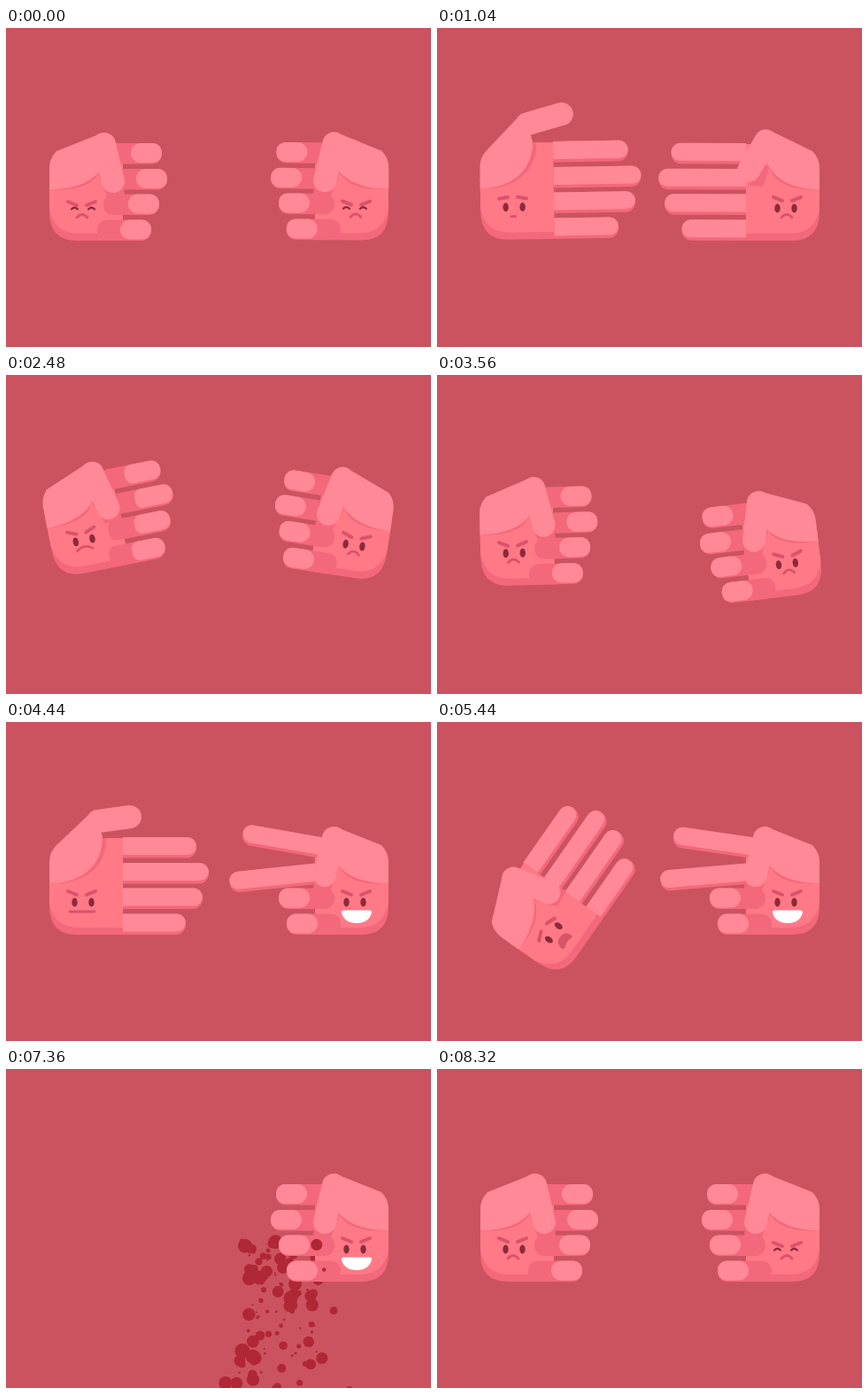
An HTML page that plays this animation: 480x360 px, repeating every 8360 ms.

```html
<!DOCTYPE html>
<html lang="en">
<head>
<meta charset="utf-8">
<title>Rock paper scissors</title>
<style>
html, body { margin: 0; width: 100%; height: 100%; overflow: hidden; background: #cb535f; }
svg { display: block; width: 100vw; height: 100vh; }
</style>
</head>
<body>
<svg id="stage" viewBox="0 0 480 360"></svg>
<script>
const LOOP = 8360, CUT = 5850;
const LIGHT = '#ff8996', MID = '#ff7986', DARK = '#f4687b', LINE = '#d9536a', EYE = '#8c2a3b', BLOOD = '#b02735';
const stage = document.getElementById('stage');

const lerp = (a, b, p) => a + (b - a) * p;
const clamp = v => Math.max(0, Math.min(1, v));
const rnd = n => { const v = Math.sin(n * 127.1 + 11.7) * 43758.5453; return v - Math.floor(v); };
const f = v => +v.toFixed(2);
const pt = p => f(p[0]) + ' ' + f(p[1]);
const mix = (a, b, p) => [lerp(a[0], b[0], p), lerp(a[1], b[1], p)];
const shape = (d, fill) => `<path d="${d}" fill="${fill}"/>`;
const stroke = (d, color, w) => `<path d="${d}" fill="none" stroke="${color}" stroke-width="${w}" stroke-linecap="round" stroke-linejoin="round"/>`;
const dot = (x, y, r) => `<circle cx="${f(x)}" cy="${f(y)}" r="${f(r)}" fill="${BLOOD}"/>`;

// Eased value of a list of [time, value] keys
function track(t, keys) {
  if (t <= keys[0][0]) return keys[0][1];
  for (let i = 1; i < keys.length; i++) {
    const [t0, a] = keys[i - 1], [t1, b] = keys[i];
    if (t < t1) return lerp(a, b, 0.5 - 0.5 * Math.cos(Math.PI * (t - t0) / (t1 - t0)));
  }
  return keys[keys.length - 1][1];
}

// A shake: up and down strokes, a last raise, then rest
function shake(start, strokes, end) {
  const n = strokes * 2 + 1, keys = [[start, 0]];
  for (let i = 1; i <= n; i++) keys.push([start + (end - start) * i / n, i % 2 ? 15.5 : -15.5]);
  return [...keys, [end + 190, 0]];
}
const SHAKES = [...shake(10, 3, 880), ...shake(1300, 4, 2415), ...shake(3130, 3, 4000)];

const FIRST_PAPER = [[920, 0], [1015, 1.04], [1050, 1.04], [1130, 1], [1230, 1], [1340, 0]];
const L_EXT = [...FIRST_PAPER, [2390, 0], [2465, 0.3], [2600, 0], [4030, 0], [4130, 1.04], [4230, 1], [7200, 1], [7201, 0]];
const L_THUMB = [[930, 0], [1030, 1.12], [1130, 1], [1230, 1], [1340, 0], [4040, 0], [4150, 1.12], [4260, 1], [4540, 1], [4680, 0]];
const R_THUMB = [[1010, 0], [1120, 1], [1230, 1], [1340, 0]];
const R_SCISSOR = [[4030, 0], [4140, 1.05], [4230, 1], [6950, 1], [7150, 0]];

const L_TURN = [[4520, 0], [4750, -62], [5150, -62], [5450, -56], [5700, -42], [5870, -42], [6150, -62], [6450, -62], [6900, -80], [7200, -80], [7201, 0]];
const L_X = [[4520, 49], [4750, 126], [5150, 130], [5450, 140], [5700, 205], [5870, 205], [6150, 186], [6450, 186], [7000, 165], [7200, 165], [7201, 49]];
const L_Y = [[4520, 240], [4750, 238], [5150, 238], [5450, 290], [5700, 254], [5870, 258], [6150, 251], [6400, 251], [7000, 640], [7440, 640], [7850, 195], [8100, 240]];

const L_BLINK = [[0, 0], [40, 0], [110, 1], [5800, 1], [CUT, 0], [7200, 0], [7300, 1], [8325, 1], [8358, 0]];
const R_BLINK = [[0, 0], [40, 0], [110, 1], [5850, 1], [5920, 0], [6900, 0], [6980, 1], [8240, 1], [8310, 0]];
const L_BROW = [[940, 1], [1010, -0.4], [1230, -0.4], [1320, 1], [4460, 1], [4560, -1], [5800, -1], [CUT, 1]];
const L_MOUTH_W = [[940, 6], [1010, 2.5], [1230, 2.5], [1320, 6], [2380, 6], [2460, 9], [2960, 9], [3160, 6], [4160, 6], [4260, 14], [4540, 14], [4600, 6]];
const L_MOUTH_C = [[940, 7], [1010, 0], [1230, 0], [1320, 7], [4160, 7], [4260, 0], [4540, 0], [4600, 7]];
const L_WAIL = [[4560, 0], [4660, 0.65], [5780, 0.65], [CUT, 1], [7200, 1], [7201, 0]];
const R_GRIN = [[4170, 0], [4290, 1], [7900, 1], [8050, 0]];
const LAUGH = [[5640, 0], [5760, 8], [5870, 1], [5980, 9], [6080, 3], [6260, 9], [6380, 3], [6500, 10], [6620, 3], [6760, 10], [6900, 2], [7050, 7], [7250, 0]];

const FIST_TIP = [176, 182, 173, 164], OPEN_TIP = [215, 229, 222, 203];
const ROOT = [114, 114, 110, 103], TOP = [130, 159, 187.5, 216.5], STUMP = [159, 176, 167, 170];

function leftPose(t) {
  const a = track(t, SHAKES);
  const fear = t > 4700 && t < 5700 ? Math.sin(t / 18) * 1.5 : 0;
  return { turn: track(t, L_TURN) - a + fear, x: track(t, L_X) - 49 + a * 0.8, y: track(t, L_Y) - 240 - a * 0.9 };
}
function rightPose(t) {
  const a = track(t + 22, SHAKES) + track(t, LAUGH);
  return { turn: -a, x: a * 0.8, y: -a * 0.7 };
}
const place = p => `translate(${f(p.x)} ${f(p.y)}) rotate(${f(p.turn)} 49 240)`;

function toWorld(p, x, y) {
  const r = p.turn * Math.PI / 180, c = Math.cos(r), s = Math.sin(r), dx = x - 49, dy = y - 240;
  return [49 + p.x + dx * c - dy * s, 240 + p.y + dx * s + dy * c];
}

function bar(x0, x1, y, h, rl, rr) {
  return `M${f(x0 + rl)} ${f(y)}H${f(x1 - rr)}a${rr} ${rr} 0 0 1 ${rr} ${rr}v${f(h - 2 * rr)}a${rr} ${rr} 0 0 1 ${-rr} ${rr}` +
    `H${f(x0 + rl)}a${f(rl)} ${f(rl)} 0 0 1 ${f(-rl)} ${f(-rl)}v${f(2 * rl - h)}a${f(rl)} ${f(rl)} 0 0 1 ${f(rl)} ${f(-rl)}z`;
}

function finger(i, ext, spread, cut) {
  const e = clamp(ext), y = TOP[i];
  const tip = cut ? STUMP[i] : lerp(FIST_TIP[i], OPEN_TIP[i], ext);
  const open = 132 - 16 * spread, rl = 11 * (1 - e), rr = cut ? 2 : 10;
  const turn = spread * (i === 0 ? -10 : i === 1 ? 6 : 0);
  let s = shape(bar(lerp(ROOT[i], open, e), tip, y, 23.5, rl, cut ? 2 : 11), DARK) +
    shape(bar(lerp(tip - 35, open, e), tip, y, lerp(22, 20, e), rl, rr), LIGHT);
  if (cut) s += `<ellipse cx="${tip}" cy="${y + 12}" rx="5" ry="11.5" fill="${EYE}"/><ellipse cx="${tip + 1}" cy="${y + 11}" rx="2.4" ry="4" fill="#fff"/>`;
  return `<g transform="rotate(${f(turn)} 126 ${y + 12})">${s}</g>`;
}

function thumb(p) {
  const q = clamp(p);
  const k = mix([111, 131], [104, 112], p);
  const tip = mix([121, 173], [140, 107], p);
  tip[0] += 8 * Math.sin(Math.PI * q);
  const dx = k[0] - 57, dy = k[1] - 139, len = Math.hypot(dx, dy);
  const edge = [k[0] + dy / len * 13, k[1] - dx / len * 13];
  const j = mix([107, 160], [109, 130], q);
  const shade = 'M49 182C' + pt(mix([78, 184], [92, 184], q)) + ' ' + pt(mix([97, 178], [114, 160], q)) + ' ' +
    pt(mix([104, 164], [113, 131], q)) + 'L' + pt(mix([114, 190], [109, 131], q)) +
    'L' + pt(mix([134, 188], [109, 131], q)) + 'L' + pt(mix([130, 150], [109, 131], q)) + 'z';
  const web = 'M49 182V158Q49 147 57 139L' + pt(edge) + 'L' + pt(k) + 'L' + pt(j) +
    'C' + pt(mix([96, 175], [109, 158], q)) + ' ' + pt(mix([75, 182], [90, 182], q)) + ' 49 182z';
  return shape(shade, DARK) + shape(web, LIGHT) + stroke('M' + pt(k) + 'L' + pt(tip), LIGHT, 26);
}

function face(m) {
  const by = 193 + 5 * (1 - m.open), b = 2 * m.brow;
  let s = stroke(`M70 ${f(by - b)}L80 ${f(by + b)}M91 ${f(by + b)}L101 ${f(by - b)}`, LINE, 4);
  for (const x of [77.5, 96.5]) {
    s += m.open < 0.25
      ? stroke(`M${x - 3.5} 204.5Q${x} 201 ${x + 3.5} 204.5`, EYE, 2.2)
      : `<ellipse cx="${x}" cy="203.5" rx="3.2" ry="${f(5 * m.open)}" fill="${EYE}"/>`;
  }
  if (m.grin > 0.05) {
    s += `<g transform="translate(85 212.5) scale(${f(m.grin)})">${shape('M-17 2Q-17 0 -15 0H15Q17 0 17 2C16 10 9 14.5 0 14.5S-16 10 -17 2z', '#fff')}</g>`;
  } else if (m.wail > 0.05) {
    s += `<g transform="translate(87 218) scale(${f(m.wail)})">${shape('M-14 5C-14 -5 -8 -9 0 -9S14 -5 14 5Q14 9 9 8Q0 4 -9 8Q-14 9 -14 5z', LINE)}</g>`;
  } else {
    s += stroke(`M${f(86 - m.w)} 214Q86 ${f(214 - m.c)} ${f(86 + m.w)} 214`, LINE, 2.8);
  }
  return s;
}

function hand(pose, ext, spread, cut, thumbOut, mood) {
  let s = shape('M49 170L100 131H132V240H80Q49 240 49 208z', DARK) +
    shape('M49 170L100 131H132V232H82Q54 232 49 204z', MID);
  for (let i = 0; i < 4; i++) s += finger(i, ext[i], i < 2 ? spread : 0, cut);
  return `<g transform="${place(pose)}">${s}${thumb(thumbOut)}${face(mood)}</g>`;
}

function loose(t) {
  const s = (t - CUT) / 1000;
  if (s < 0 || s > 1) return '';
  const p = leftPose(CUT);
  let out = '';
  for (let i = 0; i < 4; i++) {
    const len = OPEN_TIP[i] - STUMP[i], [x, y] = toWorld(p, STUMP[i] + len / 2, TOP[i] + 12);
    const px = x + (i * 35 - 150) * s, py = y + (i === 1 ? 200 : 330 + 40 * i) * s + 750 * s * s;
    out += `<g transform="translate(${f(px)} ${f(py)}) rotate(${f(p.turn - 60 * s + i * 20 * s)})">` +
      shape(bar(-len / 2, len / 2, -12, 23.5, 3, 11), DARK) + shape(bar(-len / 2, len / 2, -12, 20, 2, 10), LIGHT) +
      `<ellipse cx="${-len / 2}" cy="0" rx="4" ry="11" fill="${BLOOD}"/></g>`;
  }
  return out;
}

// Drops falling below the blades; a few pass in front
function stream(t, front) {
  let out = '';
  const n = 250;
  for (let i = 0; i < n; i++) {
    const late = i / n, s = (t - CUT - late * 1490) / 1000;
    if (s < 0 || s > 0.95 || (i % 14 === 0) !== front) continue;
    const x = 300 + 12 * late + (rnd(i) - 0.5) * (18 + 76 * late) + (rnd(i + 300) - 0.42) * 125 * s;
    const y = 172 + 20 * late + (30 + 60 * rnd(i + 600)) * s + 230 * s * s;
    const q = rnd(i + 900);
    out += dot(x, y, 1 + 7.5 * q * q);
  }
  return out;
}

function spurt(t) {
  let out = '';
  for (let i = 0; i < 200; i++) {
    const born = CUT + i * 4.2, s = (t - born) / 1000;
    if (s < 0 || s > 0.32) continue;
    const k = i % 4, [x, y] = toWorld(leftPose(born), STUMP[k], TOP[k] + 12);
    out += dot(x + (rnd(i + 40) * 110 - 25) * s, y - (20 + 60 * rnd(i + 80)) * s + 160 * s * s,
      (1.5 + 5.5 * rnd(i + 120)) * (1 - s * 1.4));
  }
  return out;
}

function scene(t) {
  const le = track(t, L_EXT), re = track(t, FIRST_PAPER), sc = track(t, R_SCISSOR);
  const snip = t > 5100 && t < 5900 ? 0.55 + 0.45 * Math.cos((t - 5100) / 400 * Math.PI * 2) : 1;
  const long = Math.max(re, sc);
  const left = { open: track(t, L_BLINK), brow: track(t, L_BROW), w: track(t, L_MOUTH_W), c: track(t, L_MOUTH_C), grin: 0, wail: track(t, L_WAIL) };
  const right = { open: track(t, R_BLINK), brow: 1, w: 6, c: 7, grin: track(t, R_GRIN), wail: 0 };
  const cut = t >= CUT && t < 7200;
  return '<rect width="480" height="360" fill="#cb535f"/>' + stream(t, false) +
    hand(leftPose(t), [le, le, le, le], 0, cut, track(t, L_THUMB), left) + loose(t) + spurt(t) +
    '<g transform="translate(481 0) scale(-1 1)">' +
    hand(rightPose(t), [long, long, re, re], clamp(sc) * snip, false, track(t, R_THUMB), right) + '</g>' +
    stream(t, true);
}

function draw() {
  stage.innerHTML = scene(performance.now() % LOOP);
  requestAnimationFrame(draw);
}
draw();
</script>
</body>
</html>
```
